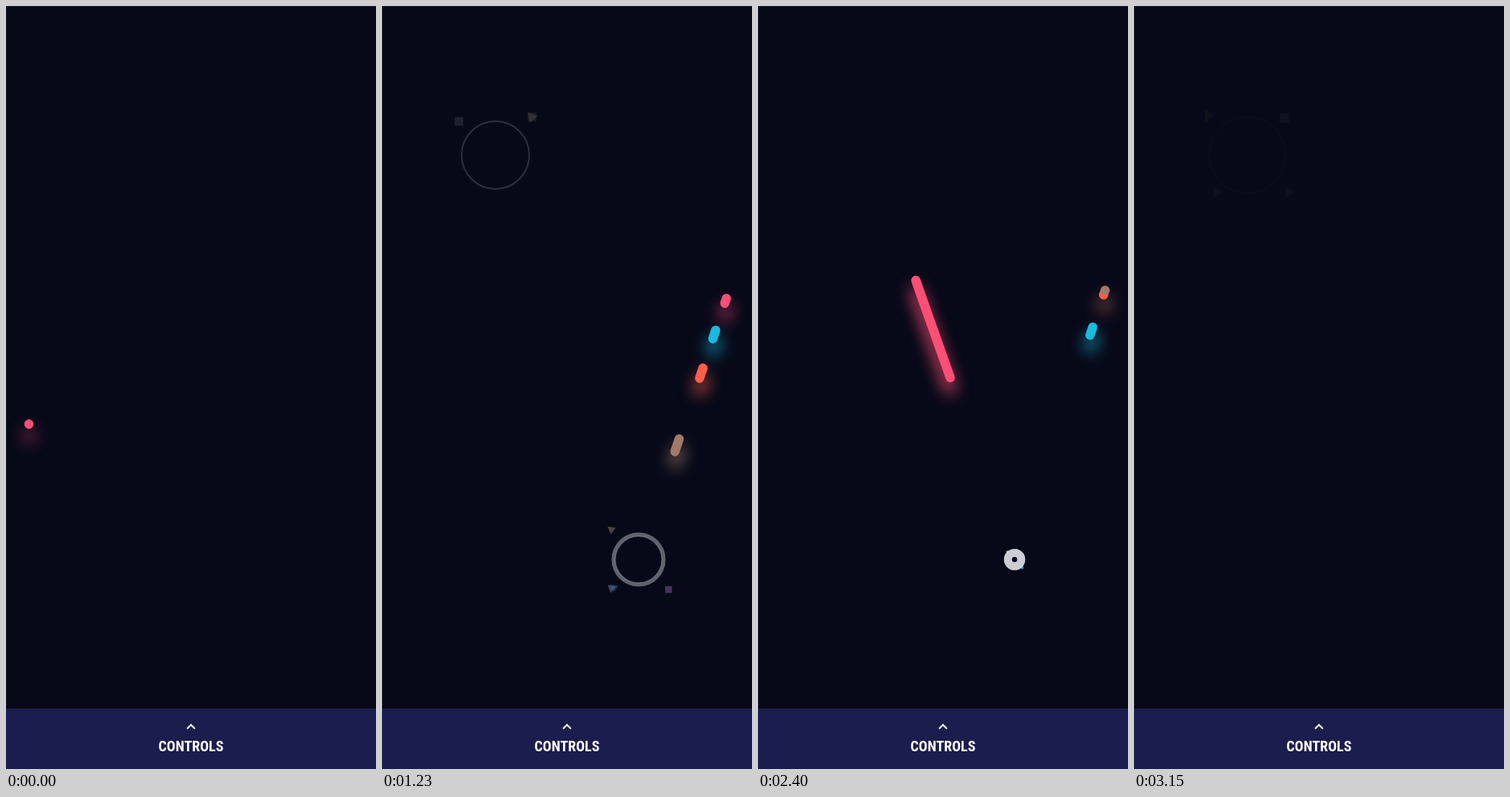
Recreate the animation shown at these times as an HTML page. Size 460 by 947 pixels, loop 3.18 s.

```html
<!DOCTYPE html>
<html lang="en">
<head>
<meta charset="utf-8">
<title>Zigzag trails</title>
<style>
  html, body { margin: 0; width: 100%; height: 100%; overflow: hidden; background: #070918; }
  svg { display: block; width: 100%; height: 100%; }
  text { font: 700 18px "Roboto Condensed", Roboto, sans-serif; font-stretch: 75%; }
</style>
</head>
<body>
<svg viewBox="0 0 460 947">
  <defs>
    <filter id="glow" filterUnits="userSpaceOnUse" x="-60" y="0" width="580" height="947"
            color-interpolation-filters="sRGB">
      <feGaussianBlur stdDeviation="10"/>
      <feOffset dy="14"/>
      <feMerge><feMergeNode/><feMergeNode in="SourceGraphic"/></feMerge>
    </filter>
  </defs>
  <rect width="460" height="947" fill="#070918"/>
  <path d="M.5 872V.5H460" fill="none" stroke="#14172b"/>
  <g id="bursts"></g>
  <g id="trails" filter="url(#glow)" fill="none" stroke-width="11.5"
     stroke-linecap="round" stroke-linejoin="round"></g>
  <rect y="872" width="460" height="75" fill="#1b1d4e"/>
  <path d="M225.2 897L230 892.2L234.8 897" fill="none" stroke="#fff" stroke-width="2"/>
  <text x="230" y="925" text-anchor="middle" fill="#fff">CONTROLS</text>
</svg>
<script>
const LOOP = 3180, STEP = 30;
const POINTS = [[28.5, 519], [141, 185], [319, 687], [431.5, 353]];
const LENGTH = POINTS.slice(1).reduce((sum, [x, y], i) =>
  sum + Math.hypot(x - POINTS[i][0], y - POINTS[i][1]), 0);
const HIDE_AT = 1530;

// gap is the lag of the tail, as a share of the duration
const TRAILS = [
  { color: '#fd4f76', start: -149, shown: -20, duration: 1771, gap: .022 },
  { color: '#19b9e0', start: 391, shown: 391, duration: 1207, gap: .012 },
  { color: '#fd5f4a', start: 568, shown: 568, duration: 1016, gap: .0087 },
  { color: '#a17a69', start: 716, shown: 716, duration: 852, gap: .0065 }
];

// debris: direction x, direction y, sides, colour
const PASSES = [
  {
    clock: t => t, points: POINTS,
    bursts: [
      { at: 690, debris: [[-1, -.92, 4, '#8c8796'], [1, -1.04, 3, '#b59a72'], [1, -1.04, 4, '#77706f']] },
      { at: 880, debris: [[-1, -1.1, 3, '#a39a80'], [-1, 1.05, 3, '#9a93ad'],
                          [-.9, 1.03, 3, '#2c7fa6'], [1.1, 1.1, 4, '#a06cc0']] }
    ]
  },
  {
    clock: t => 962 + (t - 2580) * 1.08, points: [...POINTS].reverse(),
    bursts: [
      { at: 690, debris: [[-1, -1.1, 3, '#9a94aa'], [1, 1.04, 3, '#e08a55'], [1.06, 1.14, 4, '#3f8fc0']] },
      { at: 880, debris: [[-.95, -.95, 3, '#b5a585'], [.9, -.9, 4, '#8d8578'],
                          [-.75, .9, 3, '#807a8c'], [1, .9, 3, '#807a8c']] }
    ]
  }
];

const clamp = v => Math.min(1, Math.max(0, v));
const quadOut = v => 1 - (1 - v) ** 2;
const quintInOut = v => v < .5 ? 16 * v ** 5 : 1 - 16 * (1 - v) ** 5;

function trail({ color, start, shown, duration, gap }, time, points) {
  if (time < shown || time > HIDE_AT) return '';
  const phase = (time - start) / duration;
  const head = LENGTH * quintInOut(clamp(phase));
  const tail = LENGTH * quintInOut(clamp(phase - gap));
  return `<polyline points="${points.join(' ')}" stroke="${color}"
    stroke-dasharray="${Math.max(.1, head - tail)} 3000" stroke-dashoffset="${-tail}"/>`;
}

const ring = (radius, width, opacity) =>
  `<circle r="${radius}" fill="none" stroke="#f4f3fa" stroke-width="${width}" opacity="${opacity}"/>`;

function chip([dx, dy, sides, color], e) {
  const radius = 8 * e + 1;
  const corners = Array.from({ length: sides }, (_, i) => {
    const angle = (i + .5) * 2 * Math.PI / sides;
    return [radius * Math.cos(angle), radius * Math.sin(angle)];
  });
  const turn = sides === 3 ? 60 * e : 0;
  return `<polygon points="${corners.join(' ')}" fill="${color}" opacity="${(1 - e) * 1.1}"
    transform="translate(${54 * e * dx} ${54 * e * dy}) rotate(${turn})"/>`;
}

function burst({ at, debris }, [x, y], time) {
  const age = time - at;
  if (age <= 0 || age >= 900) return '';
  const outer = quadOut(age / 900);
  const inner = quadOut(clamp((age - 140) / 600));
  let shapes = debris.map(d => chip(d, outer)).join('');
  shapes += ring(50 * outer, 12 * (1 - outer), 1 - outer);
  if (inner > 0) shapes += ring(50 * inner, 3 * (1 - inner), .7 * (1 - inner));
  return `<g transform="translate(${x} ${y})">${shapes}</g>`;
}

const trailLayer = document.getElementById('trails');
const burstLayer = document.getElementById('bursts');

function draw(t) {
  let trails = '', bursts = '';
  for (const pass of PASSES) {
    const time = pass.clock(t);
    trails += TRAILS.map(item => trail(item, time, pass.points)).join('');
    bursts += pass.bursts.map((item, i) => burst(item, pass.points[i + 1], time)).join('');
  }
  trailLayer.innerHTML = trails;
  burstLayer.innerHTML = bursts;
}

const origin = performance.now();
function tick() {
  const t = (performance.now() - origin) % LOOP;
  draw(Math.floor(t / STEP) * STEP);
  requestAnimationFrame(tick);
}
tick();
</script>
</body>
</html>
```
